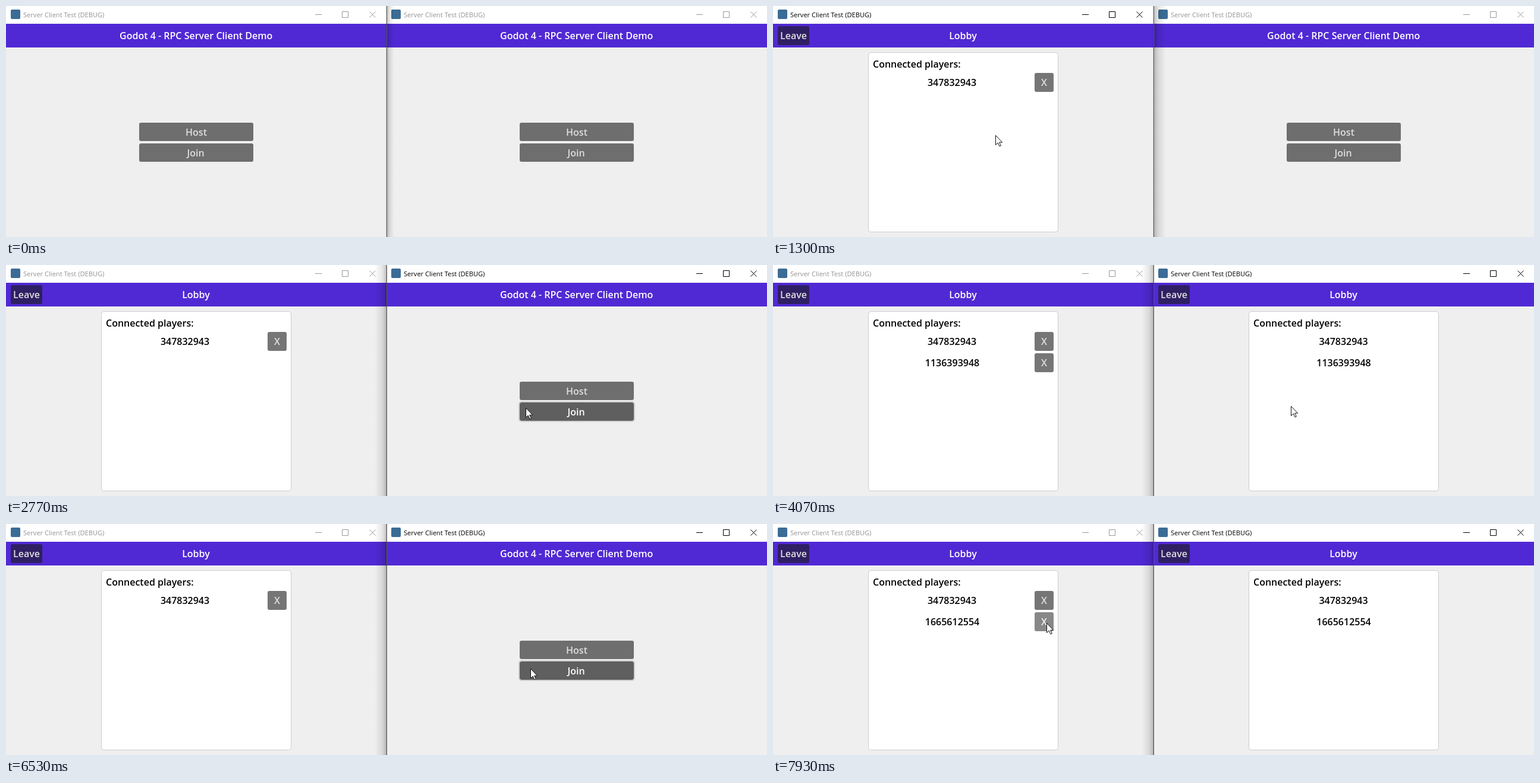
These frames come from a looping animation (1280x390 px, 8000 ms). An HTML page:

```html
<!DOCTYPE html>
<html lang="en">
<head>
<meta charset="utf-8">
<title>RPC Server Client Demo</title>
<style>
  html, body { margin: 0; width: 100%; height: 100%; overflow: hidden; background: #efefef; }
  svg { display: block; width: 1280px; height: 390px; }
  text { font: 600 16px "Open Sans", "Noto Sans", sans-serif; fill: #000; }
  .mid { text-anchor: middle; }
  .head { fill: #fff; }
  .caption { font-size: 11.1px; font-weight: 400; fill: #939393; }
  .control { fill: none; stroke: #999; }
  .active .caption { fill: #000; }
  .active .control { stroke: #000; }
  .button .face { fill: rgba(26, 26, 26, .6); }
  .button text { fill: #dfdfdf; }
  .button .ring { fill: none; stroke: #cfcfcf; stroke-width: 2; visibility: hidden; }
  .button.hover .face { fill: rgba(57, 57, 57, .6); }
  .button.hover text { fill: #f2f2f2; }
  .button.pressed .face { fill: rgba(0, 0, 0, .6); }
  .button.pressed text { fill: #fff; }
  .button.focus .ring { visibility: inherit; }
  .off { visibility: hidden; }
</style>
</head>
<body>
<svg viewBox="0 0 1280 390" xmlns="http://www.w3.org/2000/svg">
  <defs>
    <linearGradient id="fade">
      <stop offset="0" stop-opacity=".24"/>
      <stop offset=".35" stop-opacity=".1"/>
      <stop offset="1" stop-opacity="0"/>
    </linearGradient>
  </defs>
  <g id="windows"></g>
  <rect id="shadowRight" x="641" y="0" width="20" height="390" fill="url(#fade)"/>
  <rect id="shadowLeft" width="20" height="390" fill="url(#fade)" transform="matrix(-1 0 0 1 640 0)"/>
  <rect x="639" width="1" height="390" fill="#000" opacity=".18"/>
  <rect x="640" width="1" height="390" fill="#5c5c5c"/>
  <path id="cursor" d="M.5 .5V16.5L4.2 13 6.9 18.9 9.3 17.9 6.7 12.2H11.6Z"
        fill="#fff" stroke="#111" stroke-width="1"/>
</svg>
<script>
const LOOP = 8000;
const $ = id => document.getElementById(id);

// Button boxes in window coordinates: x, y, width, height, label, baseline
const BUTTONS = {
  host:  [224, 197, 192, 31, 'Host', 219],
  join:  [224, 232, 192, 31, 'Join', 254],
  leave: [8, 34, 53, 32, 'Leave', 56],
  kick1: [440, 113, 32, 32, 'X', 135],
  kick2: [440, 149, 32, 32, 'X', 171],
};

function button(side, name) {
  const [x, y, w, h, label, base] = BUTTONS[name];
  return `<g class="button" id="${side}-${name}">
    <rect class="face" x="${x}" y="${y}" width="${w}" height="${h}" rx="3"/>
    <rect class="ring" x="${x - 1}" y="${y - 1}" width="${w + 2}" height="${h + 2}" rx="4"/>
    <text class="mid" x="${x + w / 2 - (name === 'join' ? 1 : 0)}" y="${base}">${label}</text>
  </g>`;
}

function appWindow(side, left, listMid, kicks) {
  const shift = left ? 1 : 0;
  return `<g id="${side}" transform="translate(${left})">
    <rect width="640" height="390" fill="#efefef"/>
    <rect width="640" height="30" fill="#fff"/>
    <rect x="8" y="6" width="16" height="16" rx="2" fill="#3b6c96"/>
    <text class="caption" x="29" y="19">Server Client Test (DEBUG)</text>
    <path class="control" transform="translate(${shift})"
          d="M520 14.5h11M565.5 9.5h10v10h-10zM611.5 9.5l10 10M621.5 9.5l-10 10"/>
    <rect y="30" width="640" height="40" fill="#5029d4"/>
    <g id="${side}-menu">
      <text class="mid head" x="319.7" y="56">Godot 4 - RPC Server Client Demo</text>
      ${button(side, 'host')}${button(side, 'join')}
    </g>
    <g id="${side}-lobby">
      <text class="mid head" x="319.5" y="56">Lobby</text>
      ${button(side, 'leave')}
      <rect x="160.5" y="78.5" width="319" height="303" rx="4" fill="#fff" stroke="#ccc"/>
      <text x="168" y="104">Connected players:</text>
      <text class="mid" x="${listMid}" y="135">347832943</text>
      ${kicks ? button(side, 'kick1') : ''}
      <g id="${side}-guest">
        <text class="mid" id="${side}-peer" x="${listMid + .5}" y="171"></text>
        ${kicks ? button(side, 'kick2') : ''}
      </g>
    </g>
  </g>`;
}

$('windows').innerHTML = appWindow('L', 0, 301, true) + appWindow('R', 640, 319.5, false);

const easeOut = p => 1 - (1 - p) ** 2;
const easeInOut = p => p < .5 ? 2 * p * p : 1 - 2 * (1 - p) ** 2;

// Pointer moves, each in discrete steps; sag bends the path downwards
const MOVES = [
  { start: 170, end: 600, steps: 12, from: [1029, 417], to: [374, 218], ease: easeOut },
  { start: 1730, end: 2530, steps: 25, from: [374, 218], to: [874, 241], sag: 16 },
  { start: 4070, end: 4500, steps: 12, from: [874, 241], to: [690, 52] },
  { start: 5570, end: 6300, steps: 17, from: [690, 52], to: [882, 244] },
  { start: 6930, end: 7730, steps: 24, from: [882, 244], to: [465, 167] },
  { start: 7770, end: 7930, steps: 4, from: [465, 167], to: [460, 167] },
];

// Button holds: pressed from down to up, focused until done
const CLICKS = [
  { id: 'L-host', down: 1200, up: 1270, done: 1300 },
  { id: 'R-join', down: 2570, up: 2870, done: 2900 },
  { id: 'R-leave', down: 4830, up: 4970, done: 4970 },
  { id: 'R-join', down: 6530, up: 6630, done: 6670 },
];

function pointer(t) {
  const move = MOVES.filter(m => t >= m.start).pop();
  if (!move) return null;
  const { start, end, steps, from, to, sag = 0, ease = easeInOut } = move;
  const step = Math.floor((t - start) / (end - start) * (steps - 1) + 1e-6) + 1;
  const p = ease(Math.min(1, step / steps));
  const mix = i => from[i] + (to[i] - from[i]) * p;
  return [Math.round(mix(0)), Math.round(mix(1) + sag * Math.sin(Math.PI * p))];
}

const show = (id, on) => $(id).classList.toggle('off', !on);
const between = (t, a, b) => t >= a && t < b;

function paintButtons(t, at) {
  for (const el of document.querySelectorAll('.button')) {
    const [side, name] = el.id.split('-');
    const [x, y, w, h] = BUTTONS[name];
    const px = at ? at[0] - (side === 'R' ? 640 : 0) : -1;
    const over = at && px >= x && px < x + w && at[1] >= y && at[1] < y + h;
    const click = CLICKS.find(c => c.id === el.id && between(t, c.down, c.done));
    el.classList.toggle('hover', !!over);
    el.classList.toggle('focus', !!click);
    el.classList.toggle('pressed', !!click && t < click.up);
  }
}

function draw(t) {
  const joined = between(t, 2900, 4970) || t >= 6670;
  const hosting = t >= 1300;
  show('L-menu', !hosting);
  show('L-lobby', hosting);
  show('R-menu', !joined);
  show('R-lobby', joined);
  for (const side of ['L', 'R']) {
    // An explicit "off" keeps nested rows hidden with their page
    show(side + '-guest', joined);
    $(side + '-peer').textContent = t < 5000 ? '1136393948' : '1665612554';
  }

  const leftActive = between(t, 1200, 2570);
  $('L').classList.toggle('active', leftActive);
  $('R').classList.toggle('active', t >= 2570);
  $('shadowRight').setAttribute('width', leftActive ? 20 : 12);
  $('shadowRight').setAttribute('opacity', t < 2570 ? 1 : 0);
  $('shadowLeft').setAttribute('opacity', Math.max(0, Math.min(1, (t - 2540) / 230)));

  const at = pointer(t);
  show('cursor', at);
  if (at) $('cursor').setAttribute('transform', `translate(${at})`);
  paintButtons(t, at);
}

const begin = performance.now();
function tick() {
  draw((performance.now() - begin) % LOOP);
  requestAnimationFrame(tick);
}
tick();
</script>
</body>
</html>
```
